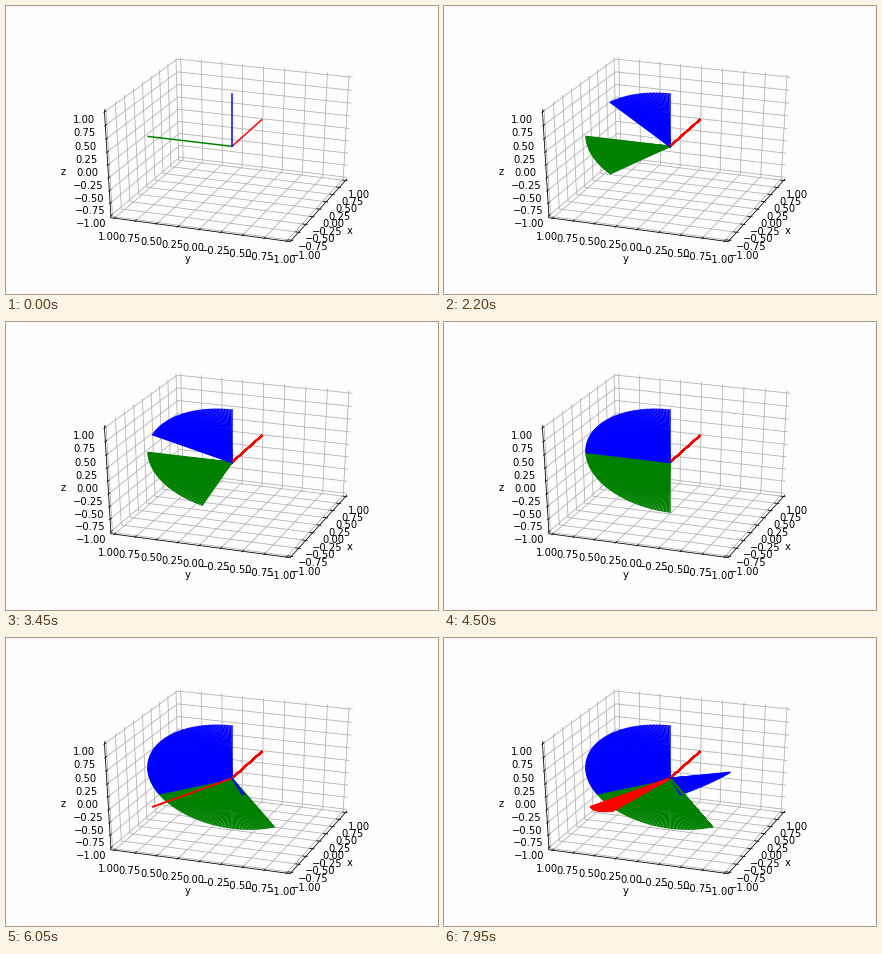
A matplotlib script for the animation above (8 s loop, 432 px wide and 288 px high).

```python
import numpy as np
import matplotlib.pyplot as plt
from matplotlib.animation import FuncAnimation
from matplotlib.collections import LineCollection

W, H, DPI = 432, 288, 72
FRAMES, INTERVAL = 160, 50
SWITCH = 120                      # degrees about x before turning about y
ELEV, AZIM, DIST = np.radians(30), np.radians(200), 10

# plot area in pixels (left, bottom, width, height)
LEFT, BOTTOM, WIDTH, HEIGHT = 0.125 * W, 0.125 * H, 0.775 * W, 0.755 * H

ce, se, ca, sa = np.cos(ELEV), np.sin(ELEV), np.cos(AZIM), np.sin(AZIM)
RIGHT = np.array([-sa, ca, 0])
UP = np.array([-se * ca, -se * sa, ce])
TOWARD = np.array([ca * ce, sa * ce, se])


def project(points):
    """Perspective view of points in the [-1, 1] cube, in pixels."""
    p = np.asarray(points, float) / 2
    depth = DIST - p @ TOWARD
    x = LEFT + WIDTH * (p @ RIGHT / depth + 0.095) / 0.185
    y = BOTTOM + HEIGHT * (p @ UP / depth + 0.095) / 0.185
    return np.stack([x, y], axis=-1)


def rot_x(deg):
    c, s = np.cos(np.radians(deg)), np.sin(np.radians(deg))
    return np.array([[1, 0, 0], [0, c, s], [0, -s, c]])


def rot_y(deg):
    c, s = np.cos(np.radians(deg)), np.sin(np.radians(deg))
    return np.array([[c, 0, -s], [0, 1, 0], [s, 0, c]])


def triad(i):
    """Columns are the three body axes at step i."""
    if i < SWITCH:
        return rot_x(i)
    return rot_x(SWITCH) @ rot_y(i)


fig = plt.figure(figsize=(W / DPI, H / DPI), dpi=DPI, facecolor="#fdfdfd")
ax = fig.add_axes([0, 0, 1, 1])
ax.set_xlim(0, W)
ax.set_ylim(0, H)
ax.axis("off")

DELTA = 1 / 6
EDGE = 1 + DELTA / 4
PER_POINT = 48 / (WIDTH + HEIGHT)
TICK_PAD = 11.5 * PER_POINT * DELTA
LABEL_PAD = 25 * PER_POINT * DELTA

# name, axis index, edge the axis runs along, direction of its tick marks
AXES = [
    ("x", 0, (0, -EDGE, -EDGE), 1),
    ("y", 1, (-EDGE, 0, -EDGE), 0),
    ("z", 2, (-EDGE, EDGE, 0), 0),
]
BACK = np.array([EDGE, EDGE, -EDGE])    # corner shared by the three panes


def along(base, index, value):
    p = np.array(base, float)
    p[index] = value
    return p


def draw_axis(name, index, edge, tick_dir):
    edge = np.array(edge, float)
    ends = project([along(edge, index, -EDGE), along(edge, index, EDGE)])
    ax.plot(*ends.T, color="k", lw=0.8, zorder=1)

    ax.text(*project(edge + np.sign(edge) * LABEL_PAD), name,
            fontsize=10, ha="center", va="center")

    others = [k for k in range(3) if k != index]
    out = np.sign(edge[tick_dir]) * DELTA
    grid = []
    for value in np.linspace(-1, 1, 9):
        corner = along(BACK, index, value)
        grid.append(project([along(corner, others[0], -BACK[others[0]]),
                             corner,
                             along(corner, others[1], -BACK[others[1]])]))
        pos = along(edge, index, value)
        tick = project([along(pos, tick_dir, pos[tick_dir] + 0.1 * out),
                        along(pos, tick_dir, pos[tick_dir] - 0.2 * out)])
        ax.plot(*tick.T, color="k", lw=0.8, zorder=1.4)
        place = project(pos + np.sign(edge) * TICK_PAD)
        ax.text(*place, f"{value:.2f}".replace("-", "\u2212"),
                fontsize=10, ha="center", va="top")
    ax.add_collection(LineCollection(grid, colors="#b0b0b0", linewidths=0.8,
                                     zorder=1.2), autolim=False)


for spec in AXES:
    draw_axis(*spec)

ORIGIN = np.zeros(3)
strokes = [project([ORIGIN, tip]) for i in range(FRAMES) for tip in triad(i).T]
trail = LineCollection([], colors=["r", "g", "b"], linewidths=1.5,
                       capstyle="projecting", zorder=2)
ax.add_collection(trail, autolim=False)


def update(i):
    trail.set_segments(strokes[:3 * (i + 1)])
    return [trail]


anim = FuncAnimation(fig, update, frames=FRAMES, interval=INTERVAL,
                     init_func=lambda: update(0), repeat=True)
plt.show()
```
